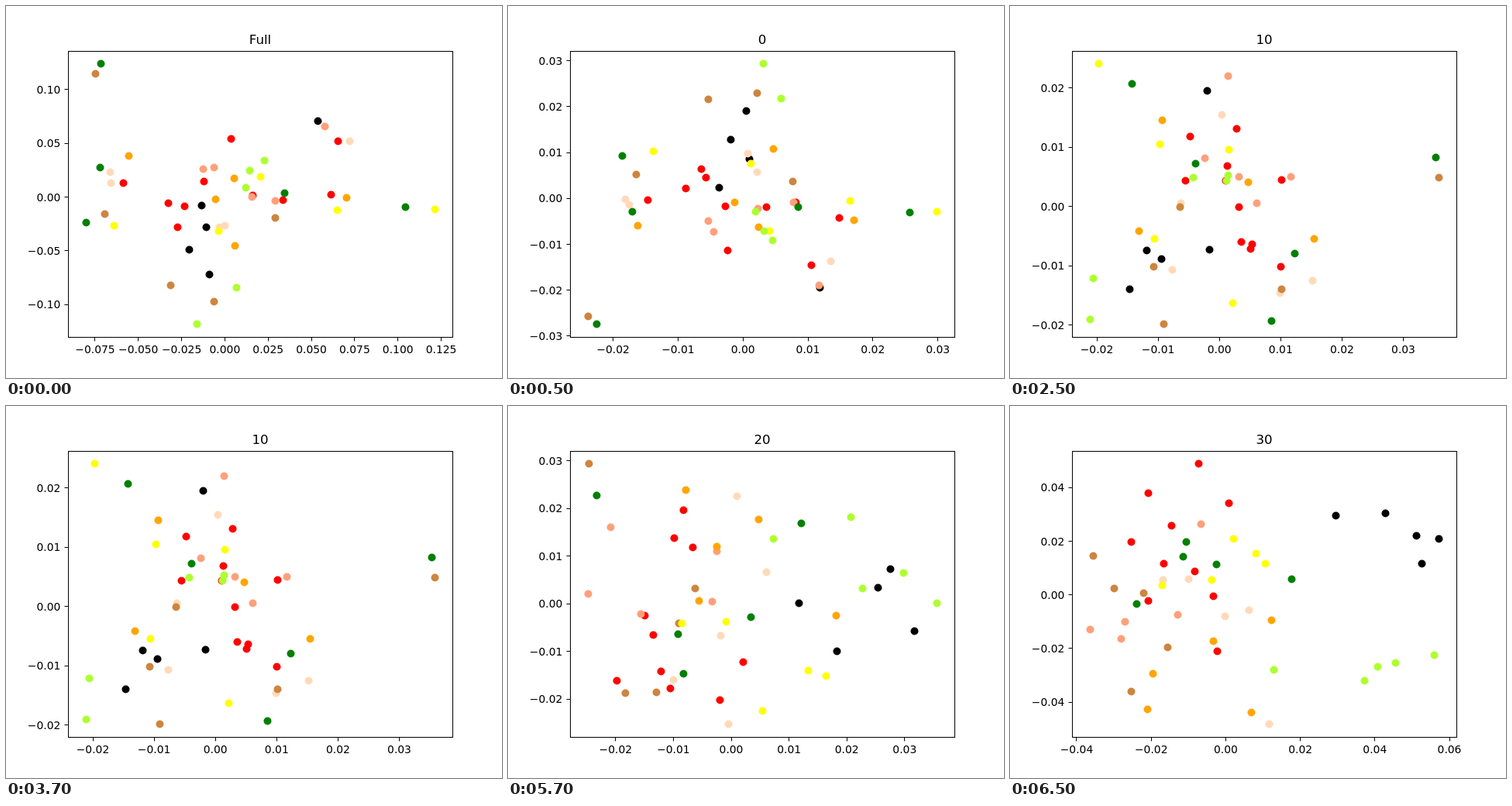
Recreate the animation shown at these times as an HTML page with a canvas. Size 640 by 480 pixels, loop 8000 ms.

```html
<!DOCTYPE html>
<html lang="en">
<head>
<meta charset="utf-8">
<title>Scatter steps</title>
<style>
html, body { margin: 0; width: 100%; height: 100%; overflow: hidden; background: #fff; }
canvas { display: block; width: 640px; height: 480px; }
</style>
</head>
<body>
<canvas id="c" width="640" height="480"></canvas>
<script>
const ctx = document.getElementById('c').getContext('2d');
const LOOP = 8000;
const LEFT = 80.5, RIGHT = 576.5, TOP = 58.5, BOTTOM = 427.5;
const plots = [];

// axis: zero = pixel of value 0, gap = pixels per tick, from/to = tick indices
const axis = (zero, gap, from, to, step, digits) => ({ zero, gap, from, to, step, digits });
const add = (start, title, x, y, groups) => plots.push({ start, title, x, y, groups });

add(0, 'Full', axis(282.4, 55.82, -3, 5, 0.025, 3), axis(246.5, -69.35, -2, 2, 0.05, 2), {
  black: [402,148, 252,257, 258,285, 236,314, 262,346],
  red: [290,171, 428,174, 255,226, 151,228, 209,254, 230,258, 221,285, 318,244, 357,250, 419,243],
  lightsalmon: [411,155, 254,210, 268,208, 317,246, 347,251],
  peachpuff: [443,174, 134,214, 135,228, 275,285, 282,283],
  peru: [115,87, 127,268, 347,273, 212,360, 268,381],
  orange: [158,193, 294,222, 270,249, 439,247, 295,309],
  yellow: [328,220, 139,283, 274,290, 427,263, 553,262],
  greenyellow: [333,199, 314,212, 309,234, 297,363, 246,410],
  green: [122,74, 121,208, 103,279, 359,241, 515,259]
});

add(500, '0', axis(303.2, 83.8, -2, 3, 0.01, 2), axis(248.2, -59.2, -3, 3, 0.01, 2), {
  black: [307,135, 287,172, 311,197, 272,234, 402,363],
  red: [249,210, 255,221, 229,235, 180,250, 280,258, 333,259, 371,253, 427,273, 391,334, 283,315],
  lightsalmon: [258,277, 265,291, 322,261, 368,253, 401,360],
  peachpuff: [309,190, 321,214, 151,249, 156,256, 416,329],
  peru: [258,120, 321,112, 165,217, 367,226, 103,400],
  orange: [342,184, 292,253, 167,283, 323,285, 446,276],
  yellow: [187,187, 313,203, 441,251, 553,265, 337,290],
  greenyellow: [329,74, 352,119, 319,265, 330,290, 341,302],
  green: [147,193, 160,265, 374,259, 518,266, 114,410]
});

add(2500, '10', axis(270.2, 79.1, -2, 3, 0.01, 2), axis(258.6, -76.5, -2, 2, 0.01, 2), {
  black: [254,109, 176,315, 195,326, 257,314, 154,365],
  red: [232,168, 292,158, 280,206, 226,225, 278,225, 350,224, 295,259, 298,304, 312,307, 310,313, 349,336],
  lightsalmon: [281,90, 251,196, 295,220, 362,220, 318,254],
  peachpuff: [273,140, 220,254, 209,340, 390,354, 348,370],
  peru: [219,259, 185,336, 350,365, 198,410, 553,221],
  orange: [196,147, 166,290, 307,227, 392,300],
  yellow: [114,74, 193,178, 282,185, 186,300, 287,383],
  greenyellow: [236,221, 281,218, 279,225, 107,351, 103,404],
  green: [157,100, 239,203, 367,319, 337,406, 549,195]
});

add(4500, '20', axis(288, 74.6, -2, 3, 0.01, 2), axis(255, -61.5, -2, 3, 0.01, 2), {
  black: [493,210, 477,234, 375,254, 524,290, 424,316],
  red: [226,134, 214,170, 238,182, 176,270, 187,295, 140,354, 197,342, 209,364, 303,330, 273,379],
  lightsalmon: [132,156, 103,242, 269,187, 263,252, 171,268],
  peachpuff: [295,116, 333,214, 274,296, 213,353, 284,410],
  peru: [104,74, 241,235, 220,280, 151,370, 191,369],
  orange: [229,108, 323,146, 269,181, 246,251, 423,270],
  yellow: [281,278, 224,280, 387,341, 410,348, 328,393],
  greenyellow: [442,143, 342,171, 457,235, 510,215, 553,254],
  green: [114,115, 378,151, 313,272, 219,294, 226,345]
});

add(6500, '30', axis(278.4, 96.2, -2, 3, 0.02, 2), axis(243.6, -69.25, -2, 2, 0.02, 2), {
  black: [420,141, 484,138, 524,167, 553,171, 531,203],
  red: [243,74, 178,112, 282,125, 208,154, 156,175, 198,203, 238,213, 178,251, 262,245, 267,316],
  lightsalmon: [246,152, 216,269, 148,278, 143,300, 103,288],
  peachpuff: [197,224, 230,223, 277,271, 308,263, 334,410],
  peru: [107,193, 134,235, 172,241, 203,311, 156,368],
  orange: [337,276, 262,303, 184,345, 177,391, 311,395],
  yellow: [288,171, 317,190, 329,203, 260,224, 196,231],
  greenyellow: [340,340, 457,354, 474,336, 497,331, 547,321],
  green: [227,175, 223,194, 266,204, 363,223, 163,255]
});

function text(str, x, y, size, align) {
  ctx.font = `${size}px "DejaVu Sans", sans-serif`;
  ctx.textAlign = align;
  ctx.fillText(str, x, y);
}

function line(x1, y1, x2, y2) {
  ctx.beginPath();
  ctx.moveTo(x1, y1);
  ctx.lineTo(x2, y2);
  ctx.stroke();
}

function eachTick(a, visit) {
  for (let i = a.from; i <= a.to; i++) {
    const label = (i * a.step).toFixed(a.digits).replace('-', '\u2212');
    visit(a.zero + i * a.gap, label);
  }
}

function drawDots(groups) {
  for (const [color, pts] of Object.entries(groups)) {
    ctx.fillStyle = color;
    for (let i = 0; i < pts.length; i += 2) {
      ctx.beginPath();
      ctx.arc(pts[i] + 0.5, pts[i + 1] + 0.5, 5, 0, Math.PI * 2);
      ctx.fill();
    }
  }
}

function draw(p) {
  ctx.fillStyle = '#fff';
  ctx.fillRect(0, 0, 640, 480);
  drawDots(p.groups);

  ctx.fillStyle = ctx.strokeStyle = '#000';
  ctx.lineWidth = 1;
  ctx.strokeRect(LEFT, TOP, RIGHT - LEFT, BOTTOM - TOP);
  eachTick(p.x, (x, label) => {
    const px = Math.floor(x) + 0.5;
    line(px, BOTTOM, px, BOTTOM + 5);
    text(label, x, 448, 13.89, 'center');
  });
  eachTick(p.y, (y, label) => {
    const py = Math.floor(y) + 0.5;
    line(LEFT - 5, py, LEFT, py);
    text(label, 70.3, Math.round(y + 5.2), 13.89, 'right');
  });
  text(p.title, 328, 49, 16.67, 'center');
}

let shown = null;
function tick() {
  const t = performance.now() % LOOP;
  const plot = plots.filter(p => p.start <= t).pop();
  if (plot !== shown) draw(shown = plot);
  requestAnimationFrame(tick);
}
tick();
</script>
</body>
</html>
```
